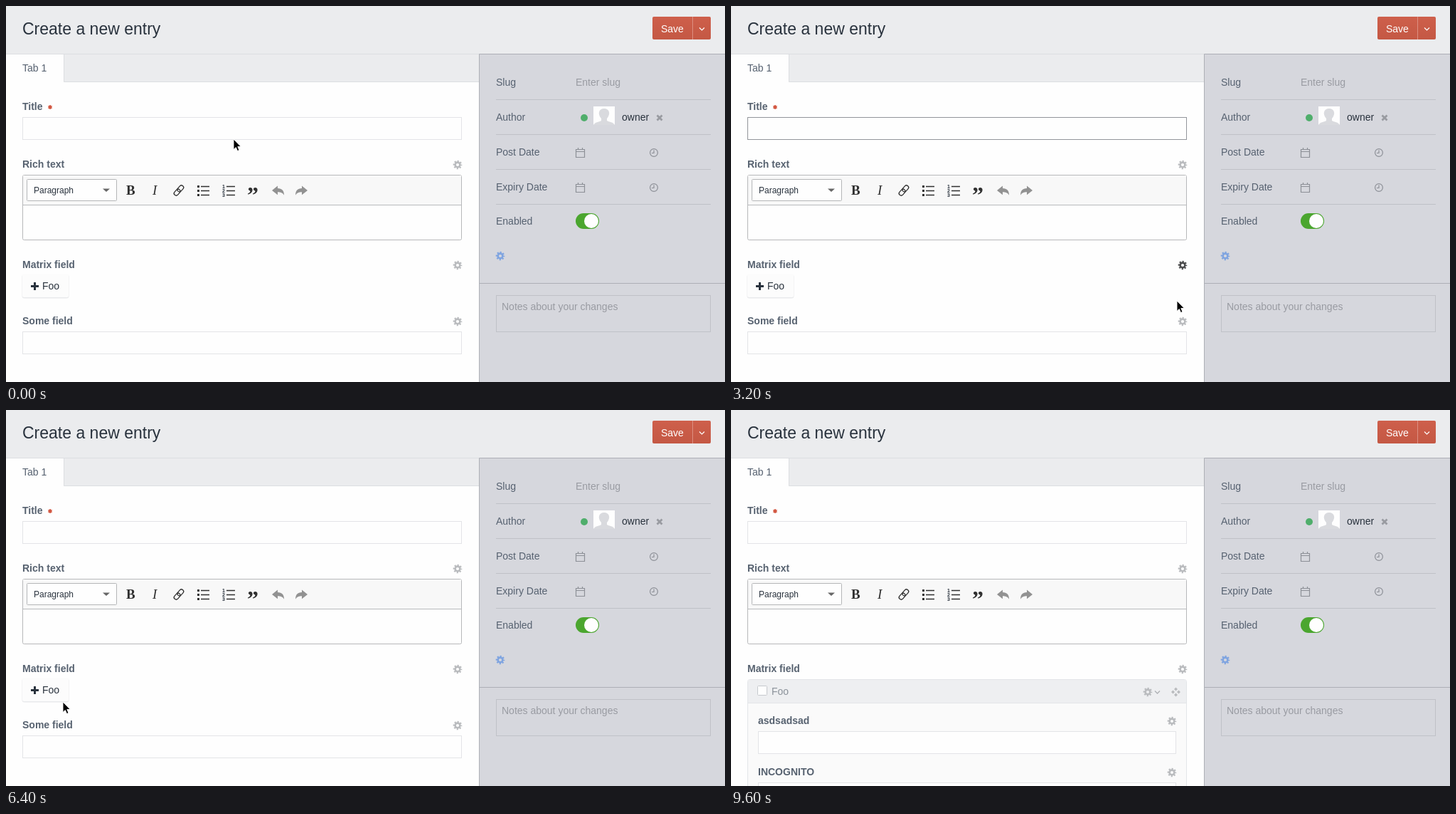
Recreate the animation shown at these times as an HTML page. Size 1011 by 528 pixels, loop 9760 ms.

```html
<!DOCTYPE html>
<html lang="en">
<head>
<meta charset="utf-8">
<title>Create a new entry</title>
<style>
html, body { margin: 0; width: 100%; height: 100%; overflow: hidden; background: #fefefe; }
svg { display: block; width: 1011px; height: 528px; font: 14px "Liberation Sans", Arial, sans-serif; fill: #29323d; }
.label { font-weight: bold; fill: #576270; }
.meta { fill: #566170; }
.hint { fill: #999ba2; }
.mono { font: 12px "DejaVu Sans Mono", monospace; fill: #8d949b; }
.serif { font-family: "Liberation Serif", serif; font-size: 19px; fill: #303030; }
.input { fill: #fefefe; stroke: #e3e4e7; }
.line { fill: none; stroke: #303030; stroke-width: 1.3; }
.soft { fill: none; stroke: #8d9097; stroke-width: 1.2; }
.gear { color: #b9bbbe; }
</style>
</head>
<body>
<svg viewBox="0 0 1011 528">
  <defs>
    <g id="gear" fill="none" stroke="currentColor">
      <circle r="3.4" stroke-width="2.6"/>
      <circle r="5.2" stroke-width="2.2" stroke-dasharray="2.042" stroke-dashoffset="1.02"/>
    </g>
    <g id="calendar" class="soft">
      <path d="M.5 2.5h12v11H.5zM.5 5.5h12M3.5 0v3M9.5 0v3"/>
    </g>
    <g id="clock" class="soft"><circle r="5.4"/><path d="M0-3.5V.5H-3"/></g>
    <path id="arrow" d="M374 259l8-6.5v3.6c6 0 9 3.4 9 9.6-2-3.6-5-4.5-9-4.5v4z" fill="#929292"/>
    <linearGradient id="red" x2="0" y2="1">
      <stop stop-color="#ce5f4b"/><stop offset="1" stop-color="#c45844"/>
    </linearGradient>
  </defs>

  <!-- header and tabs -->
  <path d="M0 0H1011V67H0zM81 67H665V107H81z" fill="#ebecee"/>
  <path d="M0 67.5H665M81.5 68V106.5H665" fill="none" stroke="#dcdee1"/>
  <path d="M0 68H81V108H0z" fill="#fefefe"/>
  <text x="23" y="40" font-size="23">Create a new entry</text>
  <rect x="909" y="15" width="82" height="32" rx="2" fill="url(#red)"/>
  <path d="M965.5 15V47" stroke="#dd8f81"/>
  <path d="M975 30.5l3.5 3.5 3.5-3.5" fill="none" stroke="#fff" stroke-width="1.2"/>
  <text x="921" y="37" fill="#fff">Save</text>
  <text x="23" y="92" class="meta">Tab 1</text>

  <!-- title -->
  <text x="23" y="146" class="label">Title</text>
  <path d="M62 139v6M59.4 140.5l5.2 3M59.4 143.5l5.2-3" stroke="#d2553f" stroke-width="1.6"/>
  <rect id="title" x="23.5" y="156.5" width="617" height="31" class="input"/>
  <rect id="caret" x="31" y="164" width="1" height="16" fill="#222"/>

  <!-- rich text -->
  <text x="23" y="227" class="label">Rich text</text>
  <rect x="23.5" y="237.5" width="617" height="91" rx="2" fill="#fefefe" stroke="#b7b8ba"/>
  <path d="M24 238H640V279H24z" fill="#f8f8f8"/>
  <path d="M24 279.5H640" stroke="#b9babc"/>
  <rect x="29.5" y="243.5" width="126" height="30" rx="1" fill="#fefefe" stroke="#b5b6b8"/>
  <text x="39" y="263" font-size="12">Paragraph</text>
  <path d="M136 256.5h10l-5 4.5z" fill="#666"/>
  <text x="169" y="265" class="serif" font-weight="bold">B</text>
  <text x="206" y="265" class="serif" font-style="italic">I</text>
  <g transform="translate(243 259) rotate(-48)" class="line">
    <rect x="-8.5" y="-3" width="10" height="6" rx="3"/>
    <rect x="-1.5" y="-3" width="10" height="6" rx="3"/>
  </g>
  <path d="M274 253.5h12M274 259.5h12M274 265.5h12M310 253.5h12M310 259.5h12M310 265.5h12" class="line"/>
  <path d="M269 253.5h3M269 259.5h3M269 265.5h3" class="line" stroke-width="3" style="stroke-width:3"/>
  <g font-size="7" font-weight="bold"><text x="304" y="256">1</text><text x="304" y="262">2</text><text x="304" y="268">3</text></g>
  <text x="339" y="276" class="serif" font-weight="bold" style="font-size:32px">”</text>
  <use href="#arrow"/>
  <use href="#arrow" transform="translate(798) scale(-1 1)"/>

  <!-- matrix -->
  <text x="23" y="368" class="label">Matrix field</text>
  <g id="below">
    <rect x="22.5" y="377" width="66" height="33.5" rx="3" fill="#e9eaec"/>
    <rect x="23" y="376" width="65" height="33" rx="2" fill="#fcfcfc"/>
    <path d="M35 393.5h11M40.5 388v11" stroke="#29323d" stroke-width="3"/>
    <text x="51" y="398">Foo</text>
    <text x="23" y="447" class="label">Some field</text>
    <rect x="23.5" y="457.5" width="617" height="31" class="input"/>
    <use href="#gear" x="635" y="443" class="gear" id="someGear"/>
  </g>
  <g id="block">
    <rect x="23.5" y="378.5" width="617" height="192" rx="3" fill="#fafafa" stroke="#e3e5e8"/>
    <path d="M24 379H640V411H24z" fill="#eeeff1"/>
    <path d="M24 411.5H640" stroke="#e3e5e8"/>
    <rect x="37.5" y="387.5" width="13" height="13" rx="1" fill="#fefefe" stroke="#c6c9cd"/>
    <text x="57" y="400" fill="#8b929a">Foo</text>
    <use href="#gear" x="586" y="396" class="gear"/>
    <path d="M596 394.5l3.5 3.5 3.5-3.5" fill="none" stroke="#adb0b4" stroke-width="1.3"/>
    <path d="M625.500 389.500l2.500 2.500-2.500 2.500-2.500-2.500zm0 8l2.500 2.500-2.500 2.500-2.500-2.500zm-4-4l2.500 2.500-2.500 2.500-2.500-2.500zm8 0l2.500 2.500-2.500 2.500-2.500-2.500z" fill="#b9bbbe"/>
    <text x="38" y="441" class="label">asdsadsad</text>
    <rect x="38.500" y="451.500" width="587" height="31" class="input"/>
    <use href="#gear" x="620" y="437" class="gear"/>
    <text x="38" y="513" class="label">INCOGNITO</text>
    <rect x="38.500" y="523.500" width="587" height="31" class="input"/>
    <use href="#gear" x="620" y="509" class="gear"/>
  </g>
  <use href="#gear" x="635" y="223" class="gear" id="richGear"/>
  <use href="#gear" x="635" y="364" class="gear" id="matrixGear"/>
  <g id="handles"></g>

  <!-- sidebar -->
  <path d="M665 67H1011V528H665z" fill="#d6d7dd"/>
  <path d="M665.500 528V67.500H1011M666 389.500H1011" fill="none" stroke="#adafb6"/>
  <path d="M689 131.500H991M689 180.500H991M689 229.500H991M689 278.500H991" stroke="#bfc1c7"/>
  <g class="meta">
    <text x="689" y="112">Slug</text>
    <text x="689" y="161">Author</text>
    <text x="689" y="210">Post Date</text>
    <text x="689" y="259">Expiry Date</text>
    <text x="689" y="307">Enabled</text>
  </g>
  <text x="801" y="112" class="hint">Enter slug</text>
  <circle cx="813" cy="157" r="5" fill="#4fae6b"/>
  <path d="M826 141h30v26H826z" fill="#fefefe"/>
  <path d="M826 167c2-4 8-4 11-6v-3c-6-7-3-14 4-14s10 7 4 14v3c3 2 9 2 11 6z" fill="#d9dade"/>
  <text x="866" y="161">owner</text>
  <path d="M915.500 153.500l7 7m0-7l-7 7" stroke="#999ba1" stroke-width="2.800"/>
  <use href="#calendar" x="801" y="199"/><use href="#clock" x="911" y="206"/>
  <use href="#calendar" x="801" y="248"/><use href="#clock" x="911" y="255"/>
  <rect x="801" y="291" width="33" height="22" rx="11" fill="#4ba62f"/>
  <circle cx="823" cy="302" r="10" fill="#fefefe"/>
  <use href="#gear" x="695" y="351" color="#7fa4e0"/>
  <rect x="689.500" y="406.500" width="301" height="51" fill="none" stroke="#bfc1c7"/>
  <text x="697" y="427" class="hint">Notes about your changes</text>

  <path id="cursor" d="M0 0V14.500L3.300 11.500 5.500 16.500 8 15.500 5.800 10.500H10.300Z" fill="#000" stroke="#fff" stroke-width=".9"/>
</svg>
<script>
const LOOP = 9760, STEP = 80;
const $ = id => document.getElementById(id);
const clamp = v => Math.min(1, Math.max(0, v));
const ramp = (t, from, to) => clamp((t - from) / (to - from));

// time, x, y of the pointer tip
const path = [
  [240, 320, 187], [400, 348, 155], [480, 348, 155], [640, 349, 134],
  [1120, 349, 134], [1440, 505, 168], [1840, 631, 220], [2160, 631, 220],
  [2240, 630, 246], [2480, 632, 320], [2880, 632, 362], [2960, 632, 362],
  [3200, 627, 414], [3600, 633, 446], [4080, 633, 446], [4320, 581, 437],
  [5920, 581, 437], [6400, 80, 410], [6560, 66, 396], [6960, 66, 396],
  [7200, 238, 445], [7920, 552, 498], [8880, 552, 498], [9200, 827, 169]
];

const fields = [
  { gear: "richGear", y: 223, name: "richText", on: 1680, off: 2320, hide: 2320, fade: 120 },
  { gear: "matrixGear", y: 364, name: "matrixField", on: 2720, off: 3120, hide: 3040, fade: 120 },
  { gear: "someGear", y: 443, name: "somefield", on: 3440, off: 4080, hide: 5360, fade: 320, grow: 4160 }
];

for (const f of fields) {
  const width = f.name.length * 7.22 + 8;
  $("handles").insertAdjacentHTML("beforeend",
    `<g><rect x="${-width}" y="-9" width="${width}" height="18" rx="2" fill="#ebecee"/>` +
    `<text class="mono" x="${4 - width}" y="4">${f.name}</text></g>`);
  f.tag = $("handles").lastChild;
}

function pointer(t) {
  const next = path.findIndex(p => p[0] > t);
  if (next === 0) return path[0].slice(1);
  if (next < 0) return path.at(-1).slice(1);
  const a = path[next - 1], b = path[next], k = ramp(t, a[0], b[0]);
  return [1, 2].map(i => a[i] + (b[i] - a[i]) * k);
}

function draw(t) {
  const focused = t >= 800 && t < 4640;
  $("title").style.stroke = focused ? "#92959a" : "";
  $("caret").style.opacity = focused && Math.floor((t - 800) / 520) % 2 ? 1 : 0;

  for (const f of fields) {
    const dark = ramp(t, f.on, f.on + 160) - ramp(t, f.off, f.off + 200);
    const [r, g, b] = [185, 187, 190].map(c => Math.round(c * (1 - dark)));
    $(f.gear).style.color = `rgb(${r},${g},${b})`;
    const grow = f.grow ? ramp(t, f.grow, f.grow + 160) : 0;
    f.tag.setAttribute("transform", `translate(${624 - 3 * grow} ${f.y}) scale(${1 + .045 * grow})`);
    f.tag.style.opacity = ramp(t, f.on, f.on + 160) - ramp(t, f.hide, f.hide + f.fade);
  }

  const k = ramp(t, 6560, 6880), open = 1 - (1 - k) ** 2;
  $("block").style.opacity = open;
  $("below").setAttribute("transform", `translate(0 ${205 * open})`);

  $("cursor").setAttribute("transform", `translate(${pointer(t)})`);
  $("cursor").style.opacity = t < 9600 ? 1 : 0;
}

const start = performance.now();
function tick() {
  const t = (performance.now() - start) % LOOP;
  draw(Math.floor(t / STEP) * STEP);
  requestAnimationFrame(tick);
}
tick();
</script>
</body>
</html>
```
